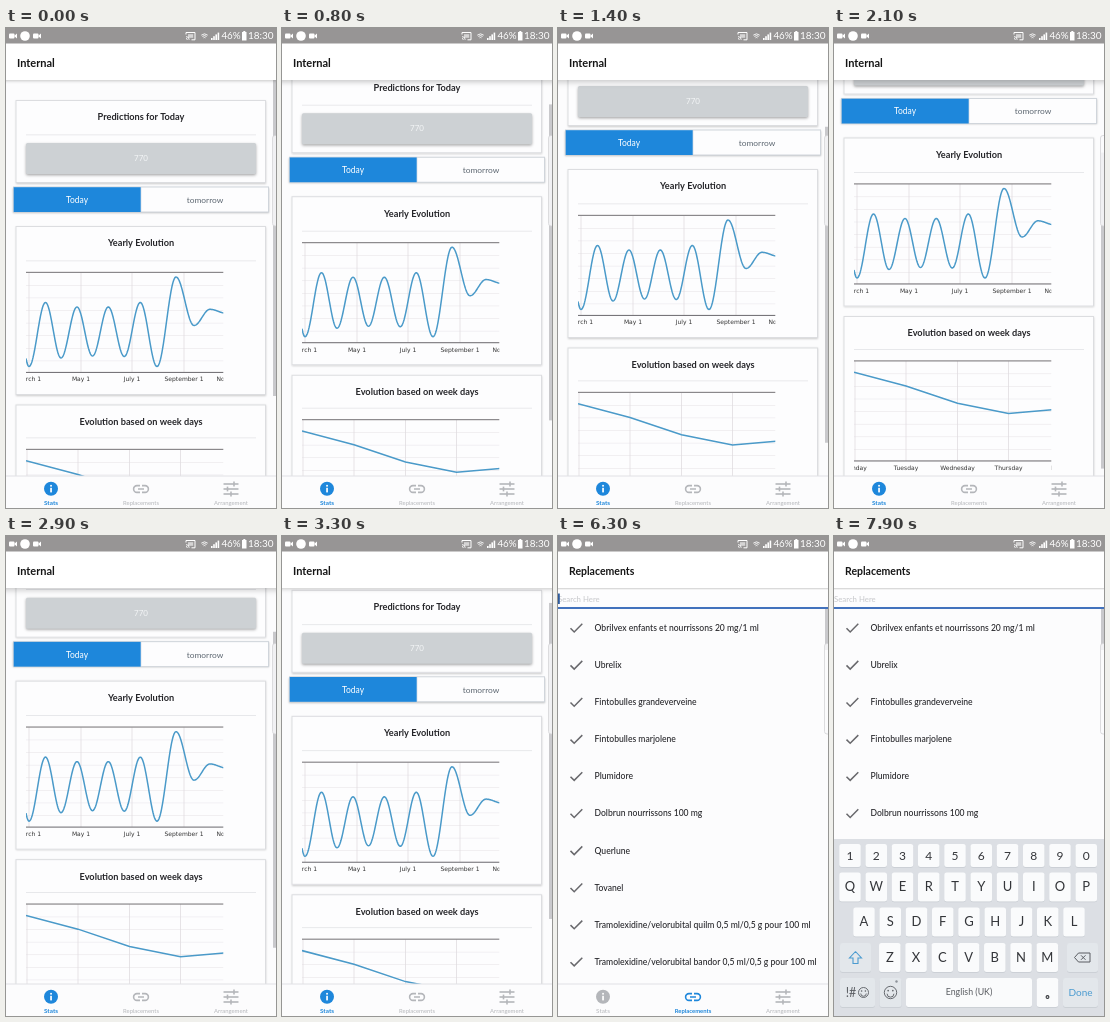
Recreate the animation shown at these times as an HTML page with a canvas. Size 270x480 px, loop 8 s.

```html
<!DOCTYPE html>
<html lang="en">
<head>
<meta charset="utf-8">
<title>Stats app</title>
<style>
html, body { margin: 0; width: 100%; height: 100%; overflow: hidden; background: #fcfcfd; }
canvas { display: block; width: 270px; height: 480px; }
</style>
</head>
<body>
<canvas id="stage"></canvas>
<script>
const W = 270, H = 480, LOOP = 8000;
const BLUE = '#1e87db', INK = '#26262a', GREY = '#b4b6ba', LINE = '#4a9ac9';
const SWITCH_DAY = 4600, SWITCH_TAB = 5900, KEYS_IN = 7300;
const canvas = document.getElementById('stage');
const c = canvas.getContext('2d');
const dpr = window.devicePixelRatio || 1;
canvas.width = W * dpr;
canvas.height = H * dpr;

const clamp = v => Math.max(0, Math.min(1, v));
const easeOut = p => 1 - (1 - p) ** 3;
const scrollKeys = [[150, 0], [1100, 43.5], [2100, 88.5], [2500, 88.5], [3300, 18.2], [3600, 0]];

function track(keys, t) {
  if (t <= keys[0][0]) return keys[0][1];
  for (let i = 1; i < keys.length; i++) {
    const [t0, a] = keys[i - 1], [t1, b] = keys[i];
    if (t <= t1) return a + (b - a) * (t - t0) / (t1 - t0);
  }
  return keys[keys.length - 1][1];
}

function text(s, x, y, size, color = INK, align = 'center', weight = 400, family = 'Lato, "Open Sans"') {
  c.font = `${weight} ${size}px ${family}, sans-serif`;
  c.textAlign = align;
  c.textBaseline = 'alphabetic';
  c.fillStyle = color;
  c.fillText(s, x, y + size * 0.34);
}

function rect(x, y, w, h, color) {
  c.fillStyle = color;
  c.fillRect(x, y, w, h);
}

function rounded(x, y, w, h, r, color) {
  c.beginPath();
  c.roundRect(x, y, w, h, r);
  c.fillStyle = color;
  c.fill();
}

function disc(x, y, r, color) {
  c.beginPath();
  c.arc(x, y, r, 0, Math.PI * 2);
  c.fillStyle = color;
  c.fill();
}

function stroke(points, color, width = 1) {
  c.beginPath();
  points.forEach(([x, y], i) => i ? c.lineTo(x, y) : c.moveTo(x, y));
  c.strokeStyle = color;
  c.lineWidth = width;
  c.stroke();
}

function shadowed(blur, dy, color, draw) {
  c.save();
  c.shadowColor = color;
  c.shadowBlur = blur * dpr;
  c.shadowOffsetY = dy * dpr;
  draw();
  c.restore();
}

function statusBar() {
  rect(0, 0, W, 15.5, '#979595');
  for (const x of [3, 27]) {
    rounded(x, 5.5, 5.5, 5, 1, '#fff');
    c.beginPath();
    c.moveTo(x + 5, 8);
    c.lineTo(x + 8, 5.5);
    c.lineTo(x + 8, 10.5);
    c.fill();
  }
  disc(19, 8, 4.8, '#fff');
  stroke([[180, 6.5], [180, 4.5], [189, 4.5], [189, 11.8], [185.5, 11.8]], '#fff', 1);
  rect(182, 6.2, 5.2, 3.6, 'rgba(255,255,255,.6)');
  c.lineWidth = 0.9;
  for (const r of [1.3, 3.2]) {
    c.beginPath();
    c.arc(180, 11.8, r, -Math.PI / 2, 0);
    c.stroke();
  }
  for (const r of [1.5, 3.3, 5]) {
    c.beginPath();
    c.arc(198.5, 11, r, -Math.PI * 0.72, -Math.PI * 0.28);
    c.stroke();
  }
  for (let i = 0; i < 4; i++) rect(205 + i * 2.2, 10 - i * 1.8, 1.6, 2 + i * 1.8, '#fff');
  text('46%', 225, 8, 9.8, '#fff');
  rect(236, 4, 4.5, 8.5, '#fff');
  rect(237.3, 3, 2, 1, '#fff');
  text('18:30', 254.8, 8, 10, '#fff');
}

function header(title, scroll) {
  const lift = clamp(scroll / 40);
  shadowed(3 + lift * 3, 1 + lift, 'rgba(0,0,0,.22)', () => rect(-8, 15, W + 16, 37, '#fff'));
  text(title, 11, 35, title === 'Internal' ? 11 : 10.5, '#161616', 'left', 700);
}

function tabBar(active) {
  rect(0, 448, W, 32, '#fcfcfd');
  rect(0, 447.5, W, 1, '#e2e2e5');
  const tint = i => i === active ? BLUE : GREY;
  disc(45, 460.8, 7, tint(0));
  rect(44.2, 459.8, 1.7, 4.6, '#fff');
  rect(44.2, 456.9, 1.7, 1.7, '#fff');

  c.strokeStyle = tint(1);
  c.lineWidth = 1.6;
  c.beginPath();
  c.moveTo(134, 464.4);
  c.lineTo(131, 464.4);
  c.arc(131, 461, 3.4, Math.PI / 2, -Math.PI / 2);
  c.lineTo(134, 457.6);
  c.moveTo(136, 457.6);
  c.lineTo(139, 457.6);
  c.arc(139, 461, 3.4, -Math.PI / 2, Math.PI / 2);
  c.lineTo(136, 464.4);
  c.moveTo(132, 461);
  c.lineTo(138, 461);
  c.stroke();

  [[456, 228], [461, 221.5], [466, 225]].forEach(([y, knob]) => {
    stroke([[217.5, y], [232.5, y]], tint(2), 1.6);
    stroke([[knob, y - 2.4], [knob, y + 2.4]], tint(2), 1.6);
  });
  ['Stats', 'Replacements', 'Arrangement'].forEach((s, i) =>
    text(s, 45 + 90 * i, 475, i ? 5.9 : 6.4, tint(i), 'center', i === active ? 700 : 400));
}

function card(y, h, title, ruleY) {
  shadowed(2, 0.8, 'rgba(0,0,0,.2)', () => rect(9.5, y, 250.5, h, '#fdfdfe'));
  c.strokeStyle = '#dcdde0';
  c.lineWidth = 1;
  c.strokeRect(10, y + 0.5, 249.5, h - 1);
  text(title, 135, y + 17.3, 9.2, INK, 'center', 700);
  rect(20, ruleY, 230, 0.8, '#e3e4e7');
}

// Grid, frame, curve and tick labels of one clipped chart.
function chart(top, ticks, labels, draw) {
  c.save();
  c.beginPath();
  c.rect(20, top - 2, 197.3, 118);
  c.clip();
  for (let i = 1; i < 8; i++) rect(20, top + i * 12.6, 198, 0.6, '#e9e6ea');
  ticks.forEach(x => rect(x - 0.4, top, 0.8, 100, '#e0dce0'));
  draw();
  rect(20, top - 0.6, 198, 1.2, '#8a888b');
  rect(20, top + 99.5, 198, 1.1, '#77757a');
  labels.forEach((s, i) => text(s, ticks[i], top + 107, 6, '#333', 'center', 400, '"DejaVu Sans"'));
  c.restore();
}

const extrema = [[10, 274], [23, 338.5], [39.5, 274.5], [55, 330], [71, 279], [86.5, 328], [102.3, 279],
  [118.3, 328.5], [134.3, 274.5], [151, 338.5], [170, 249], [188, 297.5], [204, 281.3], [220, 285.2]];

function wave() {
  const pts = [];
  for (let x = 20; x <= 218; x += 0.5) {
    const i = extrema.findIndex(p => p[0] > x);
    const [x0, y0] = extrema[i - 1], [x1, y1] = extrema[i];
    pts.push([x, y0 + (y1 - y0) * (1 - Math.cos(Math.PI * (x - x0) / (x1 - x0))) / 2]);
  }
  stroke(pts, LINE, 1.5);
}

function dayButtons(t, tomorrow) {
  shadowed(2, 0.8, 'rgba(0,0,0,.25)', () => rect(7, 159, 256, 25, '#fdfdfe'));
  c.strokeStyle = '#d0d5db';
  c.lineWidth = 1;
  c.strokeRect(7.5, 159, 255, 25);
  rect(134.5, 159, 0.8, 25, '#d0d5db');
  rect(tomorrow ? 135 : 7.7, 159.2, 127, 24.8, BLUE);
  const p = (t - SWITCH_DAY) / 600;
  if (p > 0 && p < 1) {
    c.save();
    c.beginPath();
    c.rect(135, 159.2, 127, 24.8);
    c.clip();
    disc(172, 166, 4 + 48 * p, `rgba(10,60,110,${0.28 * (1 - p)})`);
    c.restore();
  }
  text('Today', 71, 172, 8.5, tomorrow ? '#5d6771' : '#fff');
  text('tomorrow', 199, 172, 8.4, tomorrow ? '#fff' : '#5d6771');
}

function stats(t) {
  const scroll = track(scrollKeys, t);
  const tomorrow = t >= SWITCH_DAY;
  c.save();
  c.translate(0, -scroll);
  card(72, 83, 'Predictions for ' + (tomorrow ? 'tomorrow' : 'Today'), 106.5);
  shadowed(3, 1.2, 'rgba(0,0,0,.35)', () => rounded(20, 115, 230, 31, 1.5, '#cdd1d4'));
  text(tomorrow ? '756' : '770', 135, 130.3, 8, '#f3f5f6');
  dayButtons(t, tomorrow);
  card(198, 169, 'Yearly Evolution', 232.5);
  chart(244.4, [23, 75, 126, 178, 229], ['March 1', 'May 1', 'July 1', 'September 1', 'November 1'], wave);
  card(376.5, 169, 'Evolution based on week days', 409.5);
  chart(421.4, [21, 72, 123.5, 174.5, 226], ['Monday', 'Tuesday', 'Wednesday', 'Thursday', 'Friday'], () =>
    stroke([[20, 432.8], [72, 446.5], [123.5, 463.8], [174.5, 474], [218, 470.3]], LINE, 1.5));
  c.restore();
  c.globalAlpha = 1 - clamp((t - 3900) / 400);
  rect(267, 52 + scroll * 0.82, 3, 316, '#c9c9cc');
  c.globalAlpha = 1;
  header('Internal', scroll);
}

const items = ['Obrilvex enfants et nourrissons 20 mg/1 ml', 'Ubrelix', 'Fintobulles grandeverveine',
  'Fintobulles marjolene', 'Plumidore', 'Dolbrun nourrissons 100 mg', 'Querlune', 'Tovanel',
  'Tramolexidine/velorubital quilm 0,5 ml/0,5 g pour 100 ml',
  'Tramolexidine/velorubital bandor 0,5 ml/0,5 g pour 100 ml'];

function replacements(t) {
  items.forEach((s, i) => {
    const y = 92 + i * 37.1;
    stroke([[12.5, y + 0.3], [16.2, y + 4], [24.3, y - 4.2]], '#68686c', 1.5);
    text(s, 36.5, y, 8.6, INK, 'left', 500);
  });
  rect(267, 72, 3, 42, '#c9c9cc');
  header('Replacements', 0);
  rect(0, 53.5, W, 17, '#fdfdfe');
  text('Search Here', 0, 63.8, 7.8, '#c6c7ca', 'left');
  if (t < KEYS_IN + 200) rect(0, 57.5, 1.8, 10.5, '#2c5a9c');
  rect(0, 71, W, 2, '#4272bd');
}

function key(x, y, w, h, label, size = 13, fill = '#fafbfc', color = '#34363a') {
  shadowed(0, 0.8, '#c6cbd1', () => rounded(x - w / 2, y - h / 2, w, h, 2.5, fill));
  if (label) text(label, x, y, size, color);
}

function smiley(x, y, r) {
  c.strokeStyle = '#5a5d62';
  c.lineWidth = 0.9;
  c.beginPath();
  c.arc(x, y, r, 0, Math.PI * 2);
  c.moveTo(x + r * 0.55, y + r * 0.2);
  c.arc(x, y + r * 0.2, r * 0.55, 0, Math.PI);
  c.stroke();
  disc(x - r * 0.38, y - r * 0.3, 0.8, '#5a5d62');
  disc(x + r * 0.38, y - r * 0.3, 0.8, '#5a5d62');
}

function keyboard(t) {
  if (t < KEYS_IN) return;
  const side = '#e3e7eb', sky = '#4b9bd0', mark = '#5a5d62';
  c.save();
  c.translate(0, 177 * (1 - easeOut(clamp((t - KEYS_IN + 60) / 420))));
  rect(0, 303, W, 177, '#dcdfe4');
  [['1234567890', 16, 319.5, 23, 12], ['QWERTYUIOP', 16, 351, 29, 13],
    ['ASDFGHJKL', 30, 386, 29, 13], ['ZXCVBNM', 55.8, 421.5, 29, 13]].forEach(([row, x, y, h, size]) =>
    [...row].forEach((ch, i) => key(x + i * 26.25, y, 21.5, h, ch, size)));

  key(21.5, 421.5, 31, 29, '', 0, side);
  stroke([[21.5, 415.5], [27.5, 422], [24, 422], [24, 427.5], [19, 427.5], [19, 422], [15.5, 422], [21.5, 415.5]], sky, 1.1);
  key(248.5, 421.5, 31, 29, '', 0, side);
  stroke([[240.5, 421.5], [244.5, 417], [256, 417], [256, 426], [244.5, 426], [240.5, 421.5]], mark, 1);
  stroke([[247, 419.3], [251.5, 423.8]], mark, 1);
  stroke([[251.5, 419.3], [247, 423.8]], mark, 1);

  key(23.5, 456.5, 35, 29, '', 0, side);
  text('!#', 17, 456.5, 12.5, mark);
  smiley(29.5, 456.5, 5);
  key(56.5, 456.5, 22, 29, '', 0, side);
  smiley(56.5, 456.5, 6.2);
  disc(62.5, 445.5, 1.2, '#8d9299');
  key(135, 456.5, 126, 29, 'English (UK)', 8.8, '#fafbfc', mark);
  key(213.5, 456.5, 21.5, 29, '');
  c.strokeStyle = '#34363a';
  c.lineWidth = 1.1;
  c.beginPath();
  c.arc(213.5, 461, 1.4, 0, Math.PI * 2);
  c.stroke();
  key(246.5, 456.5, 35, 29, 'Done', 10, side, sky);
  c.restore();
}

// Pull-out handle on the right screen edge.
function edgeHandle() {
  rounded(266.5, 107.5, 8, 90.5, 2.5, 'rgba(252,252,253,.8)');
  c.strokeStyle = '#d3d3d6';
  c.lineWidth = 0.8;
  c.stroke();
}

function frame(now) {
  const t = now % LOOP;
  c.setTransform(dpr, 0, 0, dpr, 0, 0);
  rect(0, 0, W, H, '#fcfcfd');
  const listOpen = t >= SWITCH_TAB;
  (listOpen ? replacements : stats)(t);
  tabBar(listOpen ? 1 : 0);
  keyboard(t);
  edgeHandle();
  statusBar();
  requestAnimationFrame(tick);
}

let start;
function tick(now) {
  start ??= now;
  frame(now - start);
}
requestAnimationFrame(tick);
</script>
</body>
</html>
```
